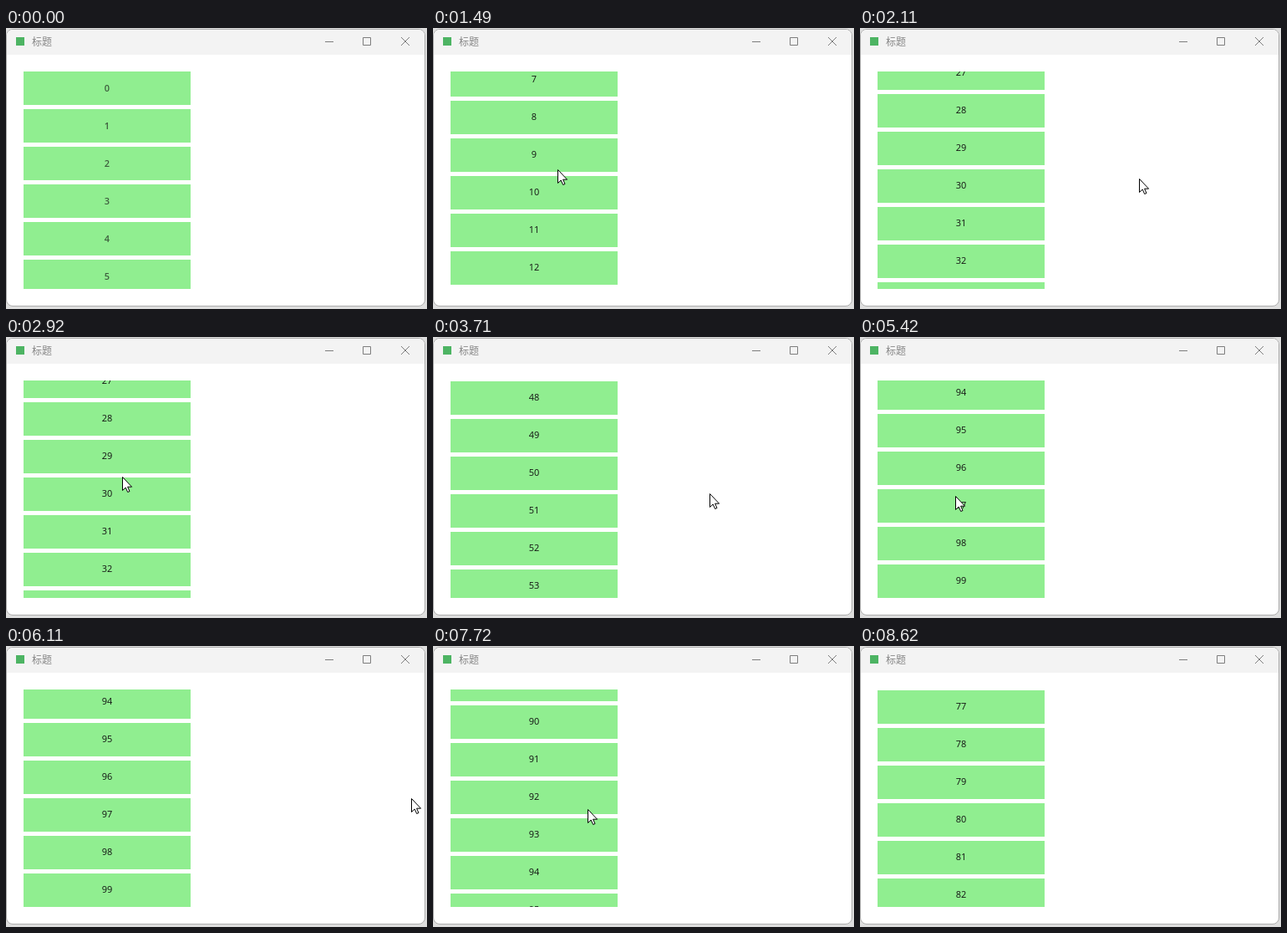
Recreate the animation shown at these times as an HTML page. Size 504 px wide and 336 px high, loop 8950 ms.

```html
<!DOCTYPE html>
<html lang="zh">
<head>
<meta charset="utf-8">
<title>标题</title>
<style>
  html, body { margin: 0; width: 100%; height: 100%; overflow: hidden; background: #dedede; }
  #stage { position: relative; width: 504px; height: 336px; overflow: hidden; }
  #window {
    position: absolute; left: 0; top: 1px; width: 502px; height: 332px;
    box-sizing: border-box; border: 1px solid #adadad; border-radius: 8px;
    background: #fff; overflow: hidden;
  }
  #bar { height: 30px; background: #f3f3f3; }
  #title {
    position: absolute; left: 31px; top: 7px;
    font: 12px/18px "Noto Sans CJK SC", "Noto Sans CJK", sans-serif; color: #858585;
  }
  svg { position: absolute; left: 0; top: 0; }
  #view { position: absolute; left: 21px; top: 52px; width: 200px; height: 260px; overflow: hidden; }
  #list { color: #111; font: 500 11px/37px "Open Sans", "Noto Sans", sans-serif; }
  #list.idle { color: #3d5c3d; font-weight: 600; line-height: 39px; }
  #list div { height: 40px; margin-bottom: 5px; background: #90ee90; text-align: center; }
  #cursor { width: 13px; height: 20px; }
</style>
</head>
<body>
<div id="stage">
  <div id="window"><div id="bar"></div></div>
  <div id="title">标题</div>
  <svg width="504" height="32" fill="none" stroke="#7d7d7d">
    <rect x="12" y="11" width="10" height="10" fill="#4db463" stroke="none"/>
    <path d="M382 16.5H392M427.5 11.5H436.5V20.5H427.5ZM473 11L483 21M483 11L473 21"/>
  </svg>
  <div id="view"><div id="list"></div></div>
  <svg id="cursor" viewBox="0 0 13 20">
    <path d="M.5 .5V16.5L4.2 13L6.7 18.5L9 17.5L6.6 12.2H11.6Z" fill="#fff" stroke="#000"/>
  </svg>
</div>
<script>
const LOOP = 8950;
const STEP = 70; // the picture advances in held steps
const CURSOR_IN = 150, FIRST_SCROLL = 1150, CURSOR_OUT = 8610;

const easeOut = u => u * (2 - u);
const smooth = u => u * u * u * (10 - 15 * u + 6 * u * u);

const flicks = [
  { start: 1140, time: 952, to: [1234] },
  { start: 3010, time: 788, to: [2170] },
  { start: 4310, time: 1005.5, to: [4235] },
  { start: 7220, time: 1330, to: [3464] }
];

const strokes = [
  { start: 150, time: 210, to: [149, 169], ease: easeOut },
  { start: 1650, time: 350, to: [334, 180] },
  { start: 2350, time: 450, to: [139, 167] },
  { start: 3200, time: 450, to: [331, 187] },
  { start: 3910, time: 280, to: [100, 190] },
  { start: 5250, time: 840, to: [485, 182] },
  { start: 6170, time: 690, to: [179, 195] },
  { start: 7650, time: 490, to: [416, 212] },
  { start: 8130, time: 450, to: [445, 330] }
];

// Chains moves: each one eases from wherever the previous one ended.
function follow(moves, origin, t) {
  let place = origin;
  for (const { start, time, to, ease = smooth } of moves) {
    if (t < start) break;
    const elapsed = Math.floor((t - start) / STEP) * STEP;
    const u = ease(Math.min(1, elapsed / time));
    place = place.map((from, i) => from + (to[i] - from) * u);
  }
  return place.map(Math.round);
}

const list = document.getElementById("list");
const cursor = document.getElementById("cursor");
for (let i = 0; i < 100; i++) {
  list.appendChild(document.createElement("div")).textContent = i;
}

function draw(t) {
  const [offset] = follow(flicks, [0], t);
  const [x, y] = follow(strokes, [439, 290], t);
  list.className = t < FIRST_SCROLL ? "idle" : "";
  list.style.transform = `translateY(${-offset}px)`;
  cursor.style.display = t >= CURSOR_IN && t < CURSOR_OUT ? "block" : "none";
  cursor.style.transform = `translate(${x}px, ${y}px)`;
}

const start = performance.now();
function tick() {
  draw((performance.now() - start) % LOOP);
  requestAnimationFrame(tick);
}
draw(0);
requestAnimationFrame(tick);
</script>
</body>
</html>
```
